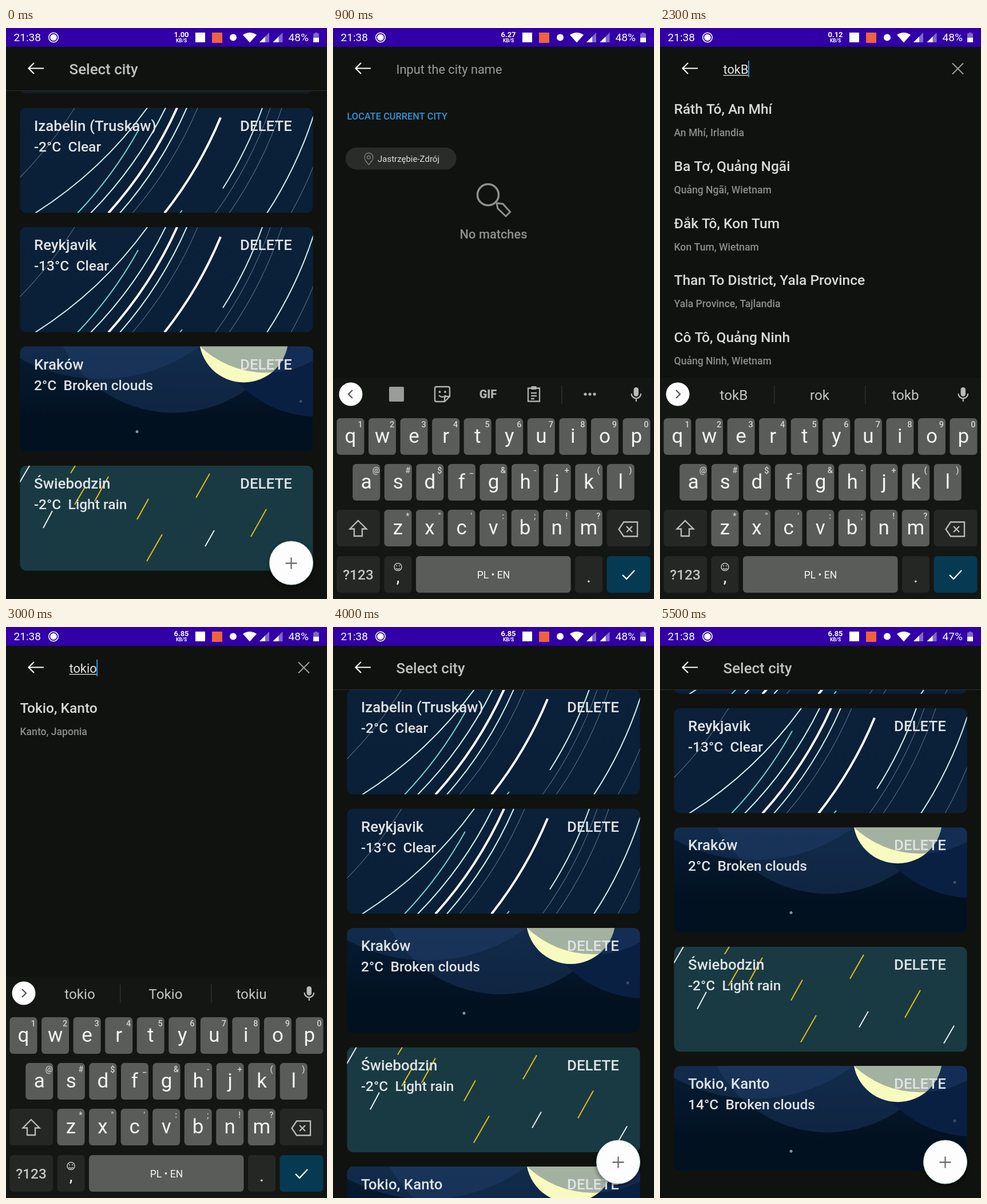
Write an HTML page with a canvas that moves like this. It is 561 by 998 pixels and loops after 5600 ms.

```html
<!DOCTYPE html>
<html lang="pl">
<head>
<meta charset="utf-8">
<title>City weather list</title>
<style>
html, body { margin: 0; width: 100%; height: 100%; overflow: hidden; background: #10120f; }
canvas { display: block; width: 100vw; height: 100vh; }
</style>
</head>
<body>
<canvas id="stage" width="561" height="998"></canvas>
<script>
const W = 561, H = 998, LOOP = 5600, STEP = 100;
const BG = '#10120f', GREY = '#9a9b9a', PURPLE = '#3100a6';
const ctx = document.getElementById('stage').getContext('2d');

const clamp = v => Math.max(0, Math.min(1, v));
const progress = (t, start, length) => clamp((t - start) / length);
const easeOut = p => 1 - (1 - p) ** 3;
// Latest value of a [time, value] list
const latest = (list, t) => list.filter(e => e[0] <= t).pop()[1];
function interpolate(points, t) {
  const i = points.findIndex(p => p[0] > t);
  if (i < 0) return points[points.length - 1][1];
  if (i === 0) return points[0][1];
  const [t0, a] = points[i - 1], [t1, b] = points[i];
  return a + (b - a) * (t - t0) / (t1 - t0);
}

// Drawing helpers
function text(s, x, y, size, color = '#dfe3e6', weight = 500, align = 'left') {
  ctx.font = `${weight} ${size}px Roboto, sans-serif`;
  ctx.fillStyle = color;
  ctx.textAlign = align;
  ctx.fillText(s, x, y);
}
function disc(x, y, r, color) {
  ctx.beginPath();
  ctx.arc(x, y, r, 0, 7);
  ctx.fillStyle = color;
  ctx.fill();
}
function ring(x, y, r, color, width) {
  ctx.beginPath();
  ctx.arc(x, y, r, 0, 7);
  ctx.strokeStyle = color;
  ctx.lineWidth = width;
  ctx.stroke();
}
function roundBox(x, y, w, h, r, color) {
  ctx.beginPath();
  ctx.roundRect(x, y, w, h, r);
  ctx.fillStyle = color;
  ctx.fill();
}
function stroke(d, color, width) {
  ctx.strokeStyle = color;
  ctx.lineWidth = width;
  ctx.stroke(new Path2D(d));
}
function fill(d, color) {
  ctx.fillStyle = color;
  ctx.fill(new Path2D(d));
}
function pin(x, y, scale, color) {
  ctx.save();
  ctx.translate(x, y);
  ctx.scale(scale, scale);
  stroke('M0 12C-5 6-7.5 3-7.5-1A7.5 7.5 0 0 1 7.5-1C7.5 3 5 6 0 12Z', color, 1.5);
  ring(0, -1, 2.8, color, 1.5);
  ctx.restore();
}

// Weather backgrounds, y measured from the card top
const TRAIL = {
  thin: ['rgba(190,215,220,.42)', 1.1],
  pale: ['#cdf3ee', 2],
  teal: ['#74d2c8', 2],
  bold: ['#ffffff', 4],
};
const TRAILS = [
  ['thin', 120, 0, 24, 122], ['pale', 247, 0, 51, 184], ['teal', 231, 40, 125, 184],
  ['pale', 279, 0, 148, 184], ['bold', 299, 0, 179, 184], ['pale', 316, 0, 199, 184],
  ['thin', 335, 0, 221, 184], ['bold', 375, 17, 277, 184], ['pale', 448, 0, 379, 141],
  ['thin', 462, 0, 366, 184], ['thin', 482, 0, 390, 184], ['pale', 537, 15, 456, 184],
  ['thin', 537, 103, 498, 184], ['teal', 308, 179, 304, 184],
];
const WHITE_DROP = '#e6eeee', GOLD_DROP = '#e2bd1b';
const DROPS = [
  [WHITE_DROP, 41, 0, 24, 29], [GOLD_DROP, 121, 0, 113, 13], [GOLD_DROP, 137, 39, 120, 68],
  [GOLD_DROP, 179, 19, 155, 62], [GOLD_DROP, 356, 14, 332, 56], [GOLD_DROP, 249, 58, 229, 94],
  [WHITE_DROP, 81, 79, 65, 109], [GOLD_DROP, 273, 120, 246, 167], [GOLD_DROP, 455, 76, 428, 124],
  [WHITE_DROP, 364, 113, 348, 141], [WHITE_DROP, 514, 138, 496, 169],
];
function backdrop(top, bottom) {
  const g = ctx.createLinearGradient(0, 0, 0, 184);
  g.addColorStop(0, top);
  g.addColorStop(0.7, bottom);
  ctx.fillStyle = g;
  ctx.fillRect(24, 0, 513, 184);
}
const scenes = {
  clear() {
    backdrop('#0b2039', '#0a1f38');
    for (const [kind, x0, y0, x1, y1] of TRAILS) {
      const dx = x1 - x0, dy = y1 - y0, bend = Math.hypot(dx, dy) / 2800;
      const cx = (x0 + x1) / 2 + dy * bend, cy = (y0 + y1) / 2 - dx * bend;
      stroke(`M${x0} ${y0}Q${cx} ${cy} ${x1} ${y1}`, ...TRAIL[kind]);
    }
  },
  broken() {
    const cloud = 'rgba(36,67,110,.4)';
    backdrop('#061d35', '#021120');
    disc(293, -104, 220, cloud);
    disc(545, -70, 193, '#0a2042');
    disc(415.5, -15, 78, '#f8fbc0');
    disc(165, -234, 291, cloud);
    disc(455, -123, 169, cloud);
    disc(229, 149, 2.5, '#87939c');
    disc(515, 96, 2.5, 'rgba(140,160,180,.35)');
  },
  rain() {
    backdrop('#193a42', '#193a42');
    for (const [color, x0, y0, x1, y1] of DROPS) stroke(`M${x0} ${y0}L${x1} ${y1}`, color, 2);
  },
  overcast() {
    backdrop('#18212a', '#151c25');
    disc(270, -110, 220, 'rgba(80,130,145,.09)');
    disc(150, -238, 291, 'rgba(80,130,145,.4)');
    disc(492, -47, 167, 'rgba(140,170,180,.5)');
    disc(458, -262, 315, 'rgba(150,185,195,.45)');
  },
};

const CITIES = [
  ['Jastrzębie-Zdrój', '0°C  Overcast clouds', 'overcast'],
  ['Izabelin (Truskaw)', '-2°C  Clear', 'clear'],
  ['Reykjavik', '-13°C  Clear', 'clear'],
  ['Kraków', '2°C  Broken clouds', 'broken'],
  ['Świebodzin', '-2°C  Light rain', 'rain'],
  ['Tokio, Kanto', '14°C  Broken clouds', 'broken'],
];
const SCROLL = [[3600, 0], [4000, 232.5], [4400, 410.5], [5400, 410.5], [5500, 408.2]];

function drawCard([name, weather, scene], y, located) {
  ctx.save();
  ctx.translate(0, y);
  ctx.save();
  ctx.beginPath();
  ctx.roundRect(24.5, 0, 512, 183.5, 11);
  ctx.clip();
  scenes[scene]();
  ctx.restore();
  if (located) pin(65, 28, 1.45, '#a9b3b8');
  text(name, located ? 94.5 : 49, 40, 25.9);
  text(weather, 49, 76, 24.55);
  text('DELETE', 409, 40, 25.9);
  ctx.restore();
}

function appFrame() {
  ctx.fillStyle = BG;
  ctx.fillRect(0, 0, W, H);
  ctx.fillStyle = PURPLE;
  ctx.fillRect(0, 0, W, 33);
  stroke('M66 70.5H39.5M49 61L39.5 70.5L49 80', '#fff', 2.2);
}

function drawGlow(t) {
  const hump = (start, length) => Math.sin(Math.PI * progress(t, start, length));
  const height = 63 * Math.max(hump(4400, 500), 0.7 * hump(4900, 400));
  if (height < 1) return;
  const r = (345 * 345 + height * height) / (2 * height);
  disc(400, H - height + r, r, 'rgba(116,71,162,.15)');
}

function drawList(t) {
  const added = t >= 3000;
  const scroll = added ? interpolate(SCROLL, t) : 202;
  appFrame();
  text('Select city', 110.5, 81, 25.9, '#c0c1c0');
  ctx.fillStyle = '#2b2d2b';
  ctx.fillRect(0, 109, W, 1);
  ctx.save();
  ctx.beginPath();
  ctx.rect(0, 110, W, H - 110);
  ctx.clip();
  CITIES.slice(0, added ? 6 : 5).forEach((city, i) => {
    const y = 133 + i * 208.5 - scroll;
    if (y < H && y > -100) drawCard(city, y, i === 0);
  });
  drawGlow(t);
  ctx.restore();
  ctx.save();
  ctx.shadowColor = 'rgba(0,0,0,.5)';
  ctx.shadowBlur = 7;
  ctx.shadowOffsetY = 3;
  disc(498.5, 935, 38.3, '#fdfdfd');
  ctx.restore();
  ring(498.5, 935, 38, '#8fc9c4', 0.7);
  stroke('M488.5 935.5h20M498.5 925.5v20', '#6e6f6e', 2.3);
}

// Search screen
const TYPED = [[0, ''], [1000, 't'], [1400, 'to'], [2000, 'tok'], [2200, 'tokB'],
  [2500, 'tok'], [2700, 'toki'], [2900, 'tokio']];
const PRESSES = [[1000, 't'], [1400, 'o'], [2000, 'k'], [2100, 'shift'], [2200, 'b'],
  [2500, 'back'], [2700, 'i'], [2900, 'o']];
const SUGGESTIONS = {
  t: ['t', 'to', 'te'], to: ['to', 'tom', 'tor'], tok: ['tok', 'rok', 'tokt'],
  tokB: ['tokB', 'rok', 'tokb'], toki: ['toki', 'tok', 'tokio'], tokio: ['tokio', 'Tokio', 'tokiu'],
};
const RESULTS = [
  ['Ráth Tó, An Mhí', 'An Mhí, Irlandia'],
  ['Ba Tơ, Quảng Ngãi', 'Quảng Ngãi, Wietnam'],
  ['Đắk Tô, Kon Tum', 'Kon Tum, Wietnam'],
  ['Than To District, Yala Province', 'Yala Province, Tajlandia'],
  ['Cô Tô, Quảng Ninh', 'Quảng Ninh, Wietnam'],
];

function drawSearch(t) {
  const typed = latest(TYPED, t);
  appFrame();
  if (typed) {
    text(typed, 110.5, 79.5, 21.8, '#e6e6e6', 400);
    const end = 110.5 + ctx.measureText(typed).width;
    ctx.fillStyle = '#e6e6e6';
    ctx.fillRect(110.5, 82, end - 110.5, 1.3);
    ctx.fillStyle = '#2f95d8';
    ctx.fillRect(end - 0.5, 57, 2, 29);
    stroke('M511 61.5L530 80.5M530 61.5L511 80.5', '#a2a3a2', 1.8);
  } else {
    text('Input the city name', 110.5, 79.5, 21.8, GREY, 400);
  }
  if (t >= 1600) {
    const found = t >= 3000 ? [['Tokio, Kanto', 'Kanto, Japonia']] : RESULTS;
    found.forEach(([title, region], i) => {
      text(title, 24.5, 150 + i * 99.8, 24.55, '#d8d9d8');
      text(region, 24.5, 189 + i * 99.8, 17.6, '#8c8d8c');
    });
    return;
  }
  text('LOCATE CURRENT CITY', 24.5, 159.5, 16.4, '#2f95d8');
  roundBox(22, 209, 193.5, 38.5, 19, '#2a2c2a');
  pin(62.5, 227, 1, '#777977');
  text('Jastrzębie-Zdrój', 78, 234, 15, '#dedfde', 400);
  ring(271, 291.5, 18.5, '#8f908f', 3.5);
  stroke('M286 306L297 307.5L309.5 321.5L302 329L288 315.5Z', '#8f908f', 3);
  text('No matches', 280.5, 368, 21.8, '#8f908f', 500, 'center');
}

// Keyboard: letters with their long-press symbols
const ROWS = [
  [6.5, 682, 'qwertyuiop', '1234567890'],
  [34.3, 762, 'asdfghjkl', '@#$_&-+()'],
  [89.5, 842, 'zxcvbnm', '*"\':;!?'],
];
function drawToolbar(typed) {
  disc(31, 640, 20.5, '#fff');
  stroke(typed ? 'M28 633L35 640L28 647' : 'M34 633L27 640L34 647', '#555', 2.3);
  roundBox(525.5, 628, 8.5, 16, 4.2, '#b9bab9');
  stroke('M521.5 639a8.3 8.3 0 0 0 16.6 0M529.8 647v6', '#b9bab9', 2.2);
  ctx.fillStyle = '#2c2f2c';
  if (typed) {
    ctx.fillRect(199, 625, 1.5, 32);
    ctx.fillRect(358, 625, 1.5, 32);
    SUGGESTIONS[typed].forEach((word, i) => text(word, 129 + i * 150, 649.5, 24.3, '#c4c5c4', 400, 'center'));
    return;
  }
  ctx.fillRect(399, 625, 1.5, 32);
  roundBox(98, 627, 26, 26, 2, GREY);
  stroke('M181 627h20q3 0 3 3v14l-9 9h-14q-3 0-3-3v-20q0-3 3-3ZM195 653v-6q0-3 3-3h6M185 642q6 6 12 0', '#b0b1b0', 2.4);
  disc(186.5, 636, 2, '#b0b1b0');
  disc(196, 636, 2, '#b0b1b0');
  text('GIF', 271, 647, 20, '#b0b1b0', 900, 'center');
  stroke('M341 629.5h20v23h-20ZM346 638h10M346 643h10M346 648h6', '#b0b1b0', 2.3);
  roundBox(346, 626, 10, 6, 2, '#b0b1b0');
  for (const x of [441, 449, 457]) disc(x, 640, 2.6, '#b0b1b0');
}
function drawKeyboard(t) {
  const pressed = (PRESSES.find(([time]) => t >= time && t < time + 100) || [])[1];
  const shifted = pressed === 'shift';
  const key = (x, y, w, color, id) =>
    roundBox(x, y, w, 64, 6, id && id === pressed ? '#7b7d7b' : color);
  ctx.fillStyle = '#141614';
  ctx.fillRect(0, 611, W, 390);
  drawToolbar(latest(TYPED, t));
  for (const [x0, y, letters, symbols] of ROWS) {
    [...letters].forEach((letter, i) => {
      const x = x0 + i * 55.55;
      key(x, y, 48, '#5a5c5a', letter);
      text(shifted ? letter.toUpperCase() : letter, x + 24, y + 42.5, 35, '#f4f4f4', 400, 'center');
      text(symbols[i], x + 41, y + 16, 14.5, '#d2d3d2', 500, 'center');
    });
  }
  key(6.5, 842, 75.5, '#252725', 'shift');
  const arrow = 'M44 861L58.5 875.5H51V888H37V875.5H29.5Z';
  if (shifted) fill(arrow, '#bcbdbc');
  stroke(arrow, '#bcbdbc', 2.3);
  key(478.5, 842, 76, '#252725', 'back');
  stroke('M508 863.5h24v25h-24l-8.5-12.5ZM513 871l10 10M523 871l-10 10', '#bcbdbc', 2.3);
  key(6.5, 923, 75.5, '#252725');
  text('?123', 44, 964, 24.5, '#c4c5c4', 500, 'center');
  key(89.5, 923, 48, '#252725');
  ring(113.5, 942, 6.5, '#c4c5c4', 1.5);
  stroke('M110 944q3.5 4 7 0', '#c4c5c4', 1.5);
  disc(111, 940, 1.1, '#c4c5c4');
  disc(116, 940, 1.1, '#c4c5c4');
  text(',', 113.5, 969, 26, '#f0f0f0', 500, 'center');
  key(145, 923, 270.5, '#5a5c5a');
  text('PL • EN', 280.5, 961.5, 17.5, '#f4f4f4', 400, 'center');
  key(423, 923, 48, '#252725');
  text('.', 447, 969, 26, '#f0f0f0', 500, 'center');
  key(478.5, 923, 76, '#053a52');
  stroke('M506 956L513 963L527 948', '#fff', 2.4);
}

function drawStatus(t) {
  const speed = latest([[0, '1.00'], [500, '6.27'], [2000, '0.12'], [2800, '6.85']], t);
  text('21:38', 13.5, 23, 19.1, '#fff', 400);
  ring(83, 16.5, 8.3, '#fff', 1.5);
  disc(83, 16.5, 5.8, '#fff');
  text(speed, 306.5, 16, 13, '#fff', 700, 'center');
  text('KB/S', 306.5, 25, 8.5, '#fff', 700, 'center');
  roundBox(331, 8, 17, 17, 0, '#fff');
  roundBox(360, 8, 18, 18, 0, '#f0623c');
  disc(397, 16.5, 6, '#fff');
  fill('M414 12Q426 4 438 12L426 25.5Z', '#fff');
  for (const x of [443, 466.5]) {
    fill(`M${x} 25L${x + 17} 8V25Z`, 'rgba(255,255,255,.4)');
    fill(`M${x} 25L${x + 10} 15V25Z`, '#fff');
  }
  text(t < 4300 ? '48%' : '47%', 493.5, 23, 19.1, '#fff', 400);
  fill('M537 9.5H540V8H544V9.5H547V25H537Z', 'rgba(255,255,255,.4)');
  fill('M537 17H547V25H537Z', '#fff');
}

// A screen opens by fading in while it grows from 85%
function openOver(below, above, p, t) {
  below(t);
  ctx.fillStyle = 'rgba(0,0,0,.2)';
  ctx.fillRect(0, 0, W, H);
  const scale = 0.85 + 0.15 * easeOut(p);
  ctx.save();
  ctx.globalAlpha = clamp(p * 2.5);
  ctx.translate(W / 2, H / 2);
  ctx.scale(scale, scale);
  ctx.translate(-W / 2, -H / 2);
  ctx.beginPath();
  ctx.rect(0, 0, W, H);
  ctx.clip();
  above(t);
  ctx.restore();
}

function draw(t) {
  if (t <= 200 || t >= 3600) drawList(t);
  else if (t < 600) openOver(drawList, drawSearch, progress(t, 200, 400), t);
  else if (t <= 3200) drawSearch(t);
  else openOver(drawSearch, drawList, progress(t, 3200, 400), t);

  const shown = easeOut(progress(t, 300, 300)) - progress(t, 3100, 200);
  if (shown > 0) {
    ctx.save();
    ctx.translate(0, 390 * (1 - shown));
    drawKeyboard(t);
    ctx.restore();
  }
  drawStatus(t);
}

function frame() {
  draw(Math.floor(performance.now() % LOOP / STEP) * STEP);
  requestAnimationFrame(frame);
}
frame();
</script>
</body>
</html>
```
